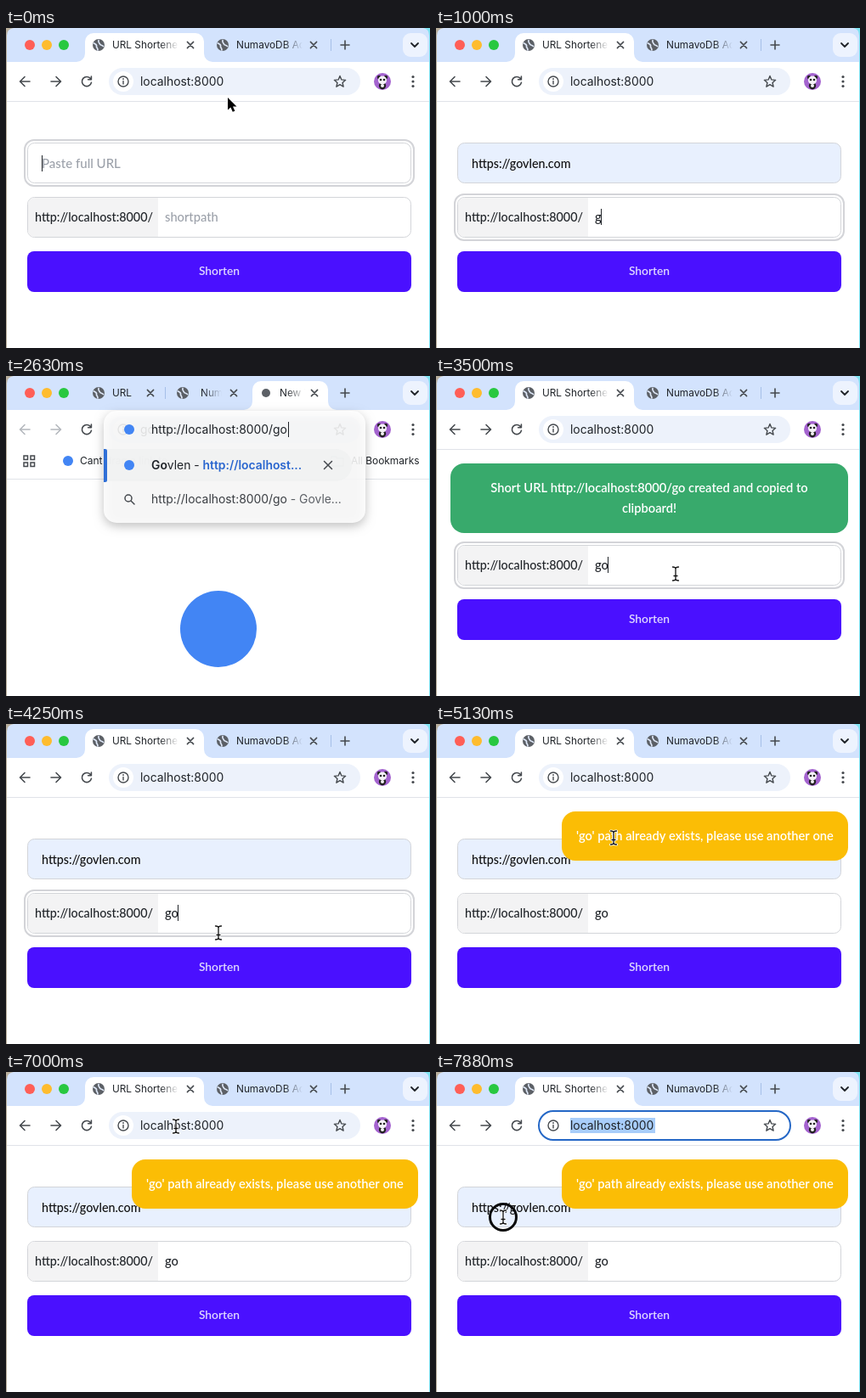
Write an HTML page with a canvas that moves like this. It is 499 px wide and 377 px high and loops after 8000 ms.

```html
<!DOCTYPE html>
<html lang="en">
<head>
<meta charset="utf-8">
<title>URL Shortener</title>
<style>
  html, body { margin: 0; width: 100%; height: 100%; overflow: hidden; background: #fff; }
  canvas { display: block; width: 499px; height: 377px; }
</style>
</head>
<body>
<canvas id="stage"></canvas>
<script>
const W = 499, H = 377, LOOP = 8000, STEP = 125;
const canvas = document.getElementById('stage');
const ctx = canvas.getContext('2d');
const dpr = window.devicePixelRatio || 1;
canvas.width = Math.round(W * dpr);
canvas.height = Math.round(H * dpr);

const UI = 'Inter, Roboto, sans-serif';
const PAGE = 'Lato, "Open Sans", sans-serif';
const INK = '#1f2328', ICON = '#45494e', DIM = '#b4b8bd', BLUE = '#4285f4';
const SITE = 'https://govlen.com', PREFIX = 'http://localhost:8000/';

// Pointer stops: time, x, y
const TRACK = [
  [3500, 282, 233], [3750, 282, 233], [4250, 250, 246], [4875, 212, 150],
  [5125, 209, 134], [5375, 209, 134], [5875, 226, 266], [6375, 222, 264],
  [6625, 240, 130], [7000, 200, 64], [7500, 200, 64], [7875, 79, 171]
];

function box(x, y, w, h, r, fill, stroke, lw = 1) {
  ctx.beginPath();
  ctx.roundRect(x, y, w, h, r);
  if (fill) { ctx.fillStyle = fill; ctx.fill(); }
  if (stroke) { ctx.strokeStyle = stroke; ctx.lineWidth = lw; ctx.stroke(); }
}

function disc(x, y, r, fill) {
  ctx.beginPath();
  ctx.arc(x, y, r, 0, 7);
  ctx.fillStyle = fill;
  ctx.fill();
}

function path(d, x, y, stroke, lw = 1.6, fill) {
  const p = new Path2D(d);
  ctx.save();
  ctx.translate(x, y);
  ctx.lineCap = ctx.lineJoin = 'round';
  if (fill) { ctx.fillStyle = fill; ctx.fill(p); }
  if (stroke) { ctx.strokeStyle = stroke; ctx.lineWidth = lw; ctx.stroke(p); }
  ctx.restore();
}

function text(s, x, y, font, fill, align = 'left') {
  ctx.font = font;
  ctx.fillStyle = fill;
  ctx.textAlign = align;
  ctx.textBaseline = 'alphabetic';
  ctx.fillText(s, x, y);
  return x + ctx.measureText(s).width;
}

const ui = (s, x, y, fill = INK, size = 13.9, weight = 400) =>
  text(s, x, y, `${weight} ${size}px ${UI}`, fill);
const page = (s, x, y, fill = INK, size = 14.3, weight = 500, align) =>
  text(s, x, y, `${weight} ${size}px ${PAGE}`, fill, align);

function fadedTitle(s, x, end) {
  const g = ctx.createLinearGradient(end - 22, 0, end, 0);
  g.addColorStop(0, 'rgba(31,35,40,1)');
  g.addColorStop(1, 'rgba(31,35,40,0)');
  ui(s, x, 24.3, g, 11.8);
}

function globe(x) {
  disc(x, 20, 7, '#5c6066');
  path('M-5.5 -2 C-3 -1 -2 0 -2.5 1.5 C-3 3 -1 3 -1 6 M0 -5.5 C-1 -3 1 -2.5 1.5 -1 C2 0.5 4 0 5.5 1.5',
    x, 20, '#dfe8f8', 1.7);
}

const cross = (x, y = 20, s = 3.6) => path(`M${-s} ${-s}L${s} ${s}M${s} ${-s}L${-s} ${s}`, x, y, ICON, 1.5);

function activeTab(x, w) {
  const r = 10, top = 6, bottom = 40;
  ctx.beginPath();
  ctx.moveTo(x - r, bottom);
  ctx.arcTo(x, bottom, x, bottom - r, r);
  ctx.arcTo(x, top, x + r, top, r);
  ctx.arcTo(x + w, top, x + w, top + r, r);
  ctx.lineTo(x + w, bottom - r);
  ctx.arcTo(x + w, bottom, x + w + r, bottom, r);
  ctx.fillStyle = '#fff';
  ctx.fill();
}

function avatar(x, y) {
  disc(x, y, 10, '#a463cf');
  disc(x - 4, y - 5, 2.2, '#222');
  disc(x + 4, y - 5, 2.2, '#222');
  disc(x, y + 5, 4.2, '#222');
  disc(x, y - 1.5, 5, '#f5f2f7');
  disc(x - 2, y - 2, 1.3, '#222');
  disc(x + 2, y - 2, 1.3, '#222');
  disc(x, y + 5, 2, '#f5f2f7');
}

function chrome(newTab) {
  ctx.fillStyle = '#d3e3fd';
  ctx.fillRect(0, 0, W, 40);
  ['#ff5f57', '#febc2e', '#28c840'].forEach((c, i) => disc(28 + i * 20, 20, 6, c));
  if (newTab) {
    activeTab(290, 89);
    globe(109);
    globe(208);
    disc(306, 20, 5, '#5c6066');
    fadedTitle('URL', 125, 168);
    fadedTitle('Numavo', 229, 254);
    fadedTitle('New Tab', 322, 352);
    [170, 268, 363].forEach(x => cross(x));
    box(187, 13, 1, 14, 0, '#a5bfe8');
  } else {
    activeTab(93, 140);
    globe(109);
    globe(255);
    fadedTitle('URL Shortener', 125, 203);
    fadedTitle('NumavoDB Admin', 271, 349);
    cross(217);
    cross(362);
    box(382, 13, 1, 14, 0, '#a5bfe8');
  }
  path('M-5 0H5M0 -5V5', 399, 20, ICON);
  box(467, 6, 29, 28, 9, '#edf3fe');
  path('M-4 -2L0 2L4 -2', 481, 20, INK, 1.8);

  const back = newTab ? DIM : ICON;
  path('M6 0H-5M0 -5.5L-5.5 0L0 5.5', 22, 63, back);
  path('M-6 0H5M0 -5.5L5.5 0L0 5.5', 59, 63, back);
  path('M4.6 -3.2A5.6 5.6 0 1 0 5.5 1.2M5.4 -6V-2.2H1.6', 95, 63, ICON);
  avatar(443, 63);
  [57.5, 63, 68.5].forEach(y => disc(479, y, 1.6, ICON));
}

function omnibox(url, focused) {
  if (focused) {
    box(121, 46, 296, 34, 17, '#fff', '#2467c6', 2);
    box(158, 54, 100, 18, 0, '#a8cdfa');
  } else {
    box(121, 47, 296, 32, 16, '#edf2fb');
    disc(138, 63, 12, '#fff');
  }
  path('M-6 0A6 6 0 1 1 6 0A6 6 0 1 1 -6 0M0 -0.5V3', 138, 63, ICON, 1.4);
  disc(138, 60, 0.9, ICON);
  ui(url, 158, 68);
  let star = '';
  for (let i = 0; i < 10; i++) {
    const a = i * Math.PI / 5 - Math.PI / 2, r = i % 2 ? 3.2 : 7;
    star += (i ? 'L' : 'M') + r * Math.cos(a) + ' ' + r * Math.sin(a);
  }
  path(star + 'Z', 393, 63.5, ICON, 1.4);
}

function field(y, focused, fill) {
  box(25.5, y + 0.5, 451, 47, 8, fill, '#d3d5d9');
  if (focused) box(22, y - 3, 458, 54, 11, null, '#d3d4d8', 2);
}

const caret = (x, y) => box(x, y, 1, 19, 0, INK);

function toast(x, h, lines, fill, alpha) {
  if (alpha <= 0) return;
  const w = 485 - x;
  ctx.globalAlpha = alpha;
  box(x, 103, w, h, 16, fill);
  lines.forEach((s, i) => page(s, x + w / 2, 137 + i * 24, '#fff', 14.7, 600, 'center'));
  ctx.globalAlpha = 1;
}

// Fade in over two steps from `start`, then settle.
function fadeIn(t, start) {
  if (t < start) return 0;
  return t < start + STEP ? 0.55 : t < start + 3 * STEP ? 0.95 : 1;
}

function form(t, hover) {
  ctx.fillStyle = '#e0e3e8';
  ctx.fillRect(0, 86, W, 1);
  const filled = t >= 375;
  const first = t < 625, second = t >= 625 && t < 5000;

  field(135, first, t >= 500 ? '#e8f0fe' : '#fff');
  page(filled ? SITE : 'Paste full URL', 42, 165, filled ? '#111' : '#9ca1aa', filled ? 14.3 : 15);
  if (first) caret(filled ? 161 : 42, 150);

  field(199, second, '#fff');
  box(26, 200, 153, 46, [7, 0, 0, 7], '#f3f3f4');
  page(PREFIX, 34, 228);
  const slug = t < 1000 ? '' : t < 1125 ? 'g' : 'go';
  const end = page(slug || 'shortpath', 187, 228, slug ? INK : '#9ca1aa', 14.7);
  const blinkOff = t >= 2000 && t < 2375;
  if (second && !blinkOff) caret(slug ? Math.round(end - 0.5) : 187, 213);

  box(25, 263, 452, 48, 8, hover ? '#3f0de6' : '#4a10ff');
  page('Shorten', 251, 291, '#e0d9ff', 13.8, 600, 'center');

  const out = t < 3750 ? 1 : t < 3875 ? 0.55 : 0;
  toast(17, 82, ['Short URL ' + PREFIX + 'go created and copied to', 'clipboard!'],
    '#38aa6c', fadeIn(t, 1625) * out);
  toast(148, 58, ["'go' path already exists, please use another one"], '#fbbd05', fadeIn(t, 4500));
}

function suggestions(alpha) {
  ctx.save();
  ctx.globalAlpha = alpha;
  ctx.shadowColor = 'rgba(0,0,0,.28)';
  ctx.shadowBlur = 12 * dpr;
  ctx.shadowOffsetY = 4 * dpr;
  box(115, 41, 308, 132, 15, '#fff');
  ctx.restore();

  ctx.globalAlpha = alpha;
  box(119, 86, 288, 38, [0, 19, 19, 0], '#f0f1f2');
  ctx.globalAlpha = 1;
  box(115, 86, 4, 39, [0, 2, 2, 0], '#2f6fd6');
  disc(145, 63, 6, BLUE);
  disc(145, 105, 6, BLUE);
  const end = ui(PREFIX + 'go', 171, 68);
  box(Math.round(end) + 1, 54, 1, 18, 0, INK);
  let x = ui('Go', 171, 110, INK, 13.9, 600);
  x = ui('vlen', x, 110);
  x = ui(' - ', x, 110);
  ui('http://localhost...', x, 110, '#2a66cf', 13.9, 600);
  cross(379, 105, 4.5);
  path('M3 0A4 4 0 1 1 -5 0A4 4 0 1 1 3 0M2 3L6 7', 145, 144, ICON, 1.5);
  x = ui(PREFIX + 'go', 171, 150, '#3a3e43');
  ui(' - Govle...', x, 150, '#5c6066');
}

function newTabPage(t) {
  const open = t < 3000;
  omnibox('govlen.com', false);
  ctx.fillStyle = '#e0e3e8';
  ctx.fillRect(0, 121, W, 1);
  [[21, 94], [29, 94], [21, 102], [29, 102]].forEach(([x, y]) =>
    box(x, y, 4.5, 4.5, 0, null, ICON, 1.5));
  disc(73, 100, 6, BLUE);
  ui('Cant drag a link to...', 87, 104.3, INK, 12);
  path('M-7 -5H-2L0 -3H7V6H-7Z', 390, 100, ICON, 1.3);
  ui('All Bookmarks', 406, 104.3, INK, 11.9);
  disc(250, 298, 45, BLUE);
  if (open) suggestions(t < 2750 ? 0.86 : 1);
}

function pointerAt(t) {
  if (t < STEP) return { x: 261, y: 82 };
  if (t < TRACK[0][0]) return null;
  let i = 0;
  while (i < TRACK.length - 2 && t >= TRACK[i + 1][0]) i++;
  const [t0, x0, y0] = TRACK[i], [t1, x1, y1] = TRACK[i + 1];
  const k = Math.min(1, (t - t0) / (t1 - t0));
  return { x: x0 + (x1 - x0) * k, y: y0 + (y1 - y0) * k };
}

const onButton = p => p && p.y >= 263 && p.y < 311;
const onText = ({ x, y }) => (y >= 130 && y < 183) || (y >= 199 && y < 247) ||
  (y > 47 && y < 79 && x > 150 && x < 380);

function pointer(p, pressed) {
  const { x, y } = p;
  if (onButton(p)) {
    path('M-1.5 -1C-1.5 -3 1.5 -3 1.5 -1V4C2 3 4 3 4.3 4.5C5 3.8 6.5 4 6.7 5.3C7.5 4.8 9 5.2 9 7V10L7.5 13V15H0V13L-4.5 7.5C-5.5 6 -3.5 5 -2.5 6.2L-1.5 7.5Z',
      x, y, '#111', 1.2, '#fff');
    path('M2 9V12M4.4 9V12M6.7 9V12', x, y, '#111', 0.8);
  } else if (onText(p)) {
    const beam = 'M-3.5 -8C-1 -8 0 -7 0 -6V6C0 7 -1 8 -3.5 8M3.5 -8C1 -8 0 -7 0 -6M0 6C0 7 1 8 3.5 8M-2 2.5H2';
    path(beam, x, y, '#fff', 3);
    path(beam, x, y, '#111', 1.3);
  } else {
    path('M0 0V14.5L3.4 11.4L5.8 16.8L8.4 15.7L6 10.4H10.5Z', x, y, '#fff', 2.2);
    path('M0 0V14.5L3.4 11.4L5.8 16.8L8.4 15.7L6 10.4H10.5Z', x, y, null, 0, '#000');
  }
  if (pressed) {
    ctx.beginPath();
    ctx.arc(x, y, 15.5, 0, 7);
    ctx.strokeStyle = '#0a0a0a';
    ctx.lineWidth = 3;
    ctx.stroke();
  }
}

function desktopEdge() {
  path('M0 0H9Q1 1 1 9V377H0Z', 0, 0, null, 0, '#b8ae9c');
  path('M499 0H491Q498 1 498 9V377H499Z', 0, 0, null, 0, '#7fe3f2');
}

function draw(t) {
  ctx.setTransform(dpr, 0, 0, dpr, 0, 0);
  ctx.fillStyle = '#fff';
  ctx.fillRect(0, 0, W, H);
  const newTab = t >= 2625 && t < 3500;
  const p = pointerAt(t);
  chrome(newTab);
  if (newTab) {
    newTabPage(t);
  } else {
    omnibox('localhost:8000', t >= 7625);
    form(t, onButton(p));
  }
  if (p) pointer(p, t >= 7875);
  desktopEdge();
}

const start = performance.now();
function tick() {
  const t = (performance.now() - start) % LOOP;
  draw(Math.floor(t / STEP) * STEP);
  requestAnimationFrame(tick);
}
tick();
</script>
</body>
</html>
```
